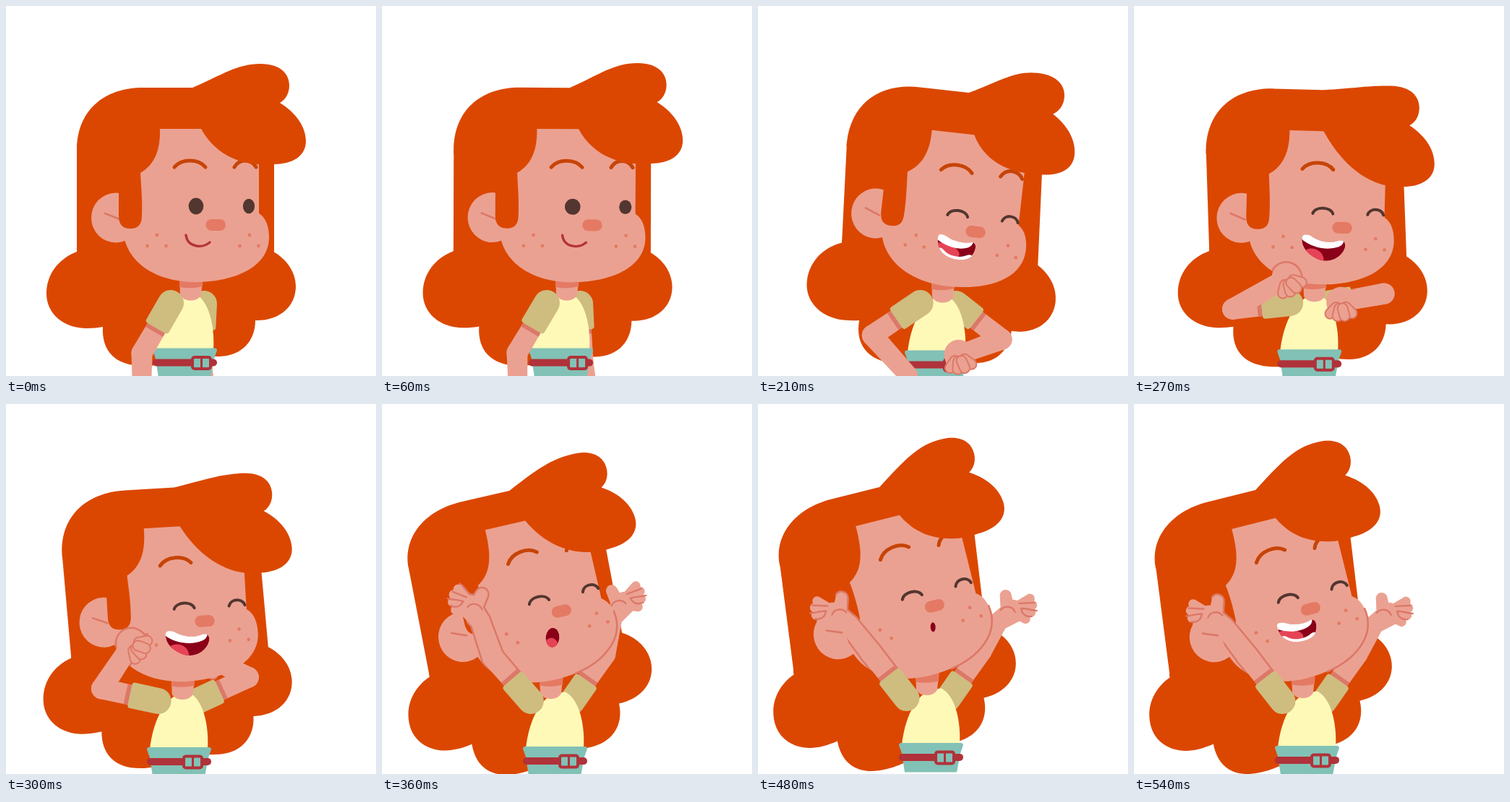
An HTML page with a canvas for the animation above (0.57 s loop, 512 by 512 pixels).

```html
<!DOCTYPE html>
<html lang="en">
<head>
<meta charset="utf-8">
<title>Cheering girl</title>
<style>
html, body { margin: 0; width: 100%; height: 100%; overflow: hidden; background: #fff; }
canvas { display: block; width: 100%; height: 100%; }
</style>
</head>
<body>
<canvas id="stage" width="512" height="512"></canvas>
<script>
const ctx = document.getElementById('stage').getContext('2d');
const LOOP = 570, STEP = 30, RAD = Math.PI / 180;
const HAIR = '#db4700', SKIN = '#eba191', LINE = '#dc7868', BLUSH = '#e47a64',
  BROW = '#c64408', EYE = '#523630', SHIRT = '#fff9b8', SLEEVE = '#cfbc7f',
  SKIRT = '#82c1b6', BELT = '#b0323a', MOUTH = '#8a0019', TONGUE = '#e64456';

// Head: tilt, place, hair sway, quiff sag. Arms: upper angle, fore angle, reach.
const POSES = [
  { at: 0, tilt: 0, x: 0, y: 0, sway: 0, sag: 0, left: [120, 90, 50], right: [93, 81, 46] },
  { at: 150, tilt: 2, x: .5, y: 1, sway: 3.5, sag: -11, left: [125, 83, 50], right: [57, 79, 44] },
  { at: 210, tilt: 6.5, x: 0, y: 5, sway: 12, sag: -5, left: [146, 48, 74], right: [38, 160, 63] },
  { at: 270, tilt: 1.5, x: -6, y: 3, sway: 11, sag: 25, left: [174, -30, 86], right: [-10, 169, 61] },
  { at: 360, tilt: -13, x: -22, y: 1, sway: -4, sag: 15, left: [229, -109, 53], right: [-55, 282, 52] },
  { at: 420, tilt: -14, x: -22, y: -1, sway: -20, sag: 2, left: [232, -128, 50], right: [-55, 300, 48] }
];

const mix = (a, b, k) => Array.isArray(a) ? a.map((v, i) => mix(v, b[i], k)) : a + (b - a) * k;

function poseAt(t) {
  const i = POSES.findLastIndex(p => p.at <= t);
  const a = POSES[i], b = POSES[i + 1] || a;
  let k = (t - a.at) / (b.at - a.at || 1);
  if (i === 0) k *= k;
  const pose = {};
  for (const key in a) pose[key] = mix(a[key], b[key], k);
  pose.lift = .9 * Math.max(0, -pose.tilt);
  return pose;
}

const hopAt = t => -8 * Math.max(0, Math.min((t - 360) / 60, (540 - t) / 120));

const tilted = (deg, x, y) => new DOMMatrix().translate(255 + x, 385 + y).rotate(deg).translate(-255, -385);
const asPath = p => typeof p === 'string' ? new Path2D(p) : p;

function place(path, m) {
  const p = new Path2D();
  p.addPath(asPath(path), m);
  return p;
}

function fill(path, color) {
  ctx.fillStyle = color;
  ctx.fill(asPath(path));
}

function stroke(path, color, width, cap = 'round') {
  ctx.strokeStyle = color;
  ctx.lineWidth = width;
  ctx.lineCap = cap;
  ctx.lineJoin = 'round';
  ctx.stroke(asPath(path));
}

function within(path, paint) {
  ctx.save();
  ctx.clip(asPath(path));
  paint();
  ctx.restore();
}

function oval(x, y, rx, ry, turn = 0) {
  const p = new Path2D();
  p.ellipse(x, y, rx, ry, turn, 0, 7);
  return p;
}

function box(...args) {
  const p = new Path2D();
  p.roundRect(...args);
  return p;
}

// Tapered capsule between two circles.
function limb(x1, y1, r1, x2, y2, r2) {
  const p = new Path2D(), a = Math.atan2(y2 - y1, x2 - x1), q = Math.PI / 2;
  p.arc(x1, y1, r1, a + q, a + 3 * q);
  p.arc(x2, y2, r2, a - q, a + q);
  p.closePath();
  return p;
}

const FACE = 'M170 150 H350 V287 C360 293 364 306 364 320 C364 362 315 382 262 382 C205 382 162 352 162 306 L160 250 Z';
const CURLS = 'M98 335 V340 C72 350 56 372 56 398 C56 426 80 446 112 446 C120 446 128 445 134 444' +
  'C132 478 152 498 190 498 C215 498 235 492 245 484 L295 485 C328 484 345 462 345 435' +
  'C378 436 401 416 401 388 C401 368 388 350 370 340 V335 Z';

function frontHair({ tilt, sag, lift }) {
  const q = (x, y, k = 1) => `${x - tilt * .3 * k} ${y + sag * k} `;
  const top = 113 + lift, part = 270 + lift / 2 - sag * .4;
  return `M98 200 C98 ${145 + lift} 135 ${top} 190 ${top} L258 ${top}` +
    `C${q(300, 95, .6)}${q(320, 80)}${q(352, 80)}C${q(380, 80)}${q(392, 94)}${q(392, 110)}` +
    `C${q(392, 122)}${q(386, 130)}${q(379, 134)}C${q(402, 148)}${q(415, 168)}${q(415, 187)}` +
    `C${q(415, 208)}${q(396, 219)}${q(370, 219)}C${q(340, 222)}${q(295, 215, .6)}${part} 170` +
    `L213 170 C214 ${200 + lift} 205 ${220 + lift} 186 ${231 + lift} C187 250 189 270 188 290` +
    'C188 302 183 308 172 308 C161 308 156 302 156 290 V258 L98 205 Z';
}

function backHair(front, back) {
  fill(place(CURLS, back), HAIR);
  const pt = (m, x, y) => { const p = m.transformPoint({ x, y }); return `${p.x} ${p.y} `; };
  fill(`M${pt(front, 98, 199)}L${pt(front, 371, 210)}L${pt(back, 371, 341)}L${pt(back, 98, 341)}Z`, HAIR);
}

function torso(x, y, neck) {
  ctx.save();
  ctx.translate(x, y);
  fill('M246 400 C225 410 211 440 207 476 H287 C289 440 280 408 262 398 Z', SHIRT);
  fill('M206 473.5 H289 Q293 474 291.5 478 L288 488 L283 514 H211 L207 488 L203.5 478 Q202 474 206 473.5 Z', SKIRT);
  stroke('M208 493.5 H287', BELT, 10);
  ctx.translate(x / 2, 0);
  const buckle = box(258, 486, 25, 16, 3);
  fill(buckle, SKIRT);
  stroke(buckle, BELT, 4);
  stroke('M270.5 487 V501', BELT, 3, 'butt');
  ctx.restore();
  ctx.save();
  ctx.translate(neck, y);
  fill('M240 370 H273 L270 400 C265 410 246 410 241 400 Z', SKIN);
  fill('M240 370 H273 L272 388 Q256 392 240 389 Z', BLUSH);
  ctx.restore();
}

// Two bones from the shoulder; the sleeve lies along the first.
function makeArm(sx, sy, [upper, fore, reach], side, grip) {
  const ux = Math.cos(upper * RAD), uy = Math.sin(upper * RAD);
  const sleeve = side < 0 ? 40 : 36;
  const ex = sx + ux * 80, ey = sy + uy * 80;
  const wx = ex + Math.cos(fore * RAD) * reach, wy = ey + Math.sin(fore * RAD) * reach;
  const open = grip === 'open', fist = grip === 'fist';
  const rest = open ? (side < 0 ? -128 : 300) : (side < 0 ? 0 : 170);
  const hand = new DOMMatrix().translate(wx, wy).rotate(fore - rest).scale(open ? side : 1, 1);
  const parts = [limb(ex, ey, 14.5, wx, wy, 13)];
  const add = (...v) => parts.push(place(limb(...v), hand));
  if (fist) add(0, -1, 20, 0, 1, 20);
  if (open) {
    add(0, 0, 13, 21, -14, 16);
    add(13, -14, 10, 10, -36, 8);
    for (let i = 0; i < 4; i++) {
      const a = i * .18 - .63, r = 54 - i * i * 1.8;
      add(22, -15, 10, r * Math.cos(a), r * Math.sin(a), 6.5);
    }
  }
  const upperLimb = limb(sx + ux * sleeve, sy + uy * sleeve, 14, ex, ey, 14.5);
  return {
    outline: [upperLimb, ...parts],
    upper() { fill(upperLimb, SKIN); },
    sleeve() {
      const cx = sx + ux * sleeve, cy = sy + uy * sleeve;
      stroke(`M${cx} ${cy} l${ux * 6} ${uy * 6}`, LINE, 28, 'butt');
      const m = new DOMMatrix().translate(sx, sy).rotate(upper);
      fill(place(box(-18, -18, sleeve + 18, 36, [18, 4, 4, 18]), m), SLEEVE);
    },
    fore() {
      parts.forEach(p => fill(p, SKIN));
      if (open)
        stroke(place('M3 -16 C9 -23 20 -21 23 -13 M29 -25 L50 -26 M31 -18 C37 -19 46 -15 53 -15 M32 -16 C33 -9 40 -6 46 -7', hand), LINE, 2.4);
      if (fist) for (const x of [-15, 15, -5, 5]) {
        const y = 21 - Math.abs(x) * .35, f = place(limb(x * .45, y * .45, 6, x, y, 6), hand);
        stroke(f, LINE, 4);
        fill(f, SKIN);
      }
    }
  };
}

const SMILE = 'M249 317 C251 334 272 336 282 327';
const GRIN = 'M240 320 C240 313 250 315 254 317 C266 323 276 325 288 323 C296 324 292 337 286 340 C268 343 244 338 240 320 Z';
const LAUGH = 'M240 313 C244 309 252 314 258 317 C268 320 278 321 286 318 C294 317 295 327 288 338 C280 347 254 346 245 334 C240 328 238 318 240 313 Z';
const SHOUT = 'M235 318 C236 311 246 314 250 317 C262 324 276 325 286 321 C296 319 297 328 293 335 C285 349 268 353 255 346 C242 340 234 330 235 318 Z';

function mouth(t) {
  const open = (shape, base, paint) => within(shape, () => { fill(shape, base); paint(); });
  if (t < 120) stroke(SMILE, '#b5343a', 3.4);
  else if (t < 210) open(GRIN, '#fff', () => fill('M287 320 H300 V345 H284 C288 336 282 331 287 320 Z', MOUTH));
  else if (t < 270 || t >= 540) open(LAUGH, MOUTH, () => {
    fill(oval(254, 333, 18, 9, .3), TONGUE);
    stroke('M243 311 C256 319 270 321 279 317', '#fff', 19);
    stroke('M244 337 C256 349 276 348 286 342', '#fff', 13);
  });
  else if (t < 330) open(SHOUT, MOUTH, () => {
    fill(oval(250, 347, 16, 14, .3), TONGUE);
    stroke('M243 314 C256 323 272 324 283 320', '#fff', 20);
  });
  else if (t < 420) open(oval(270, 336, 9.5, 13.5, .3), MOUTH, () => fill(oval(266, 345, 9, 9), TONGUE));
  else fill(oval(281, 331, 3.5, 6.5, .2), MOUTH);
}

function features(t, m, lift) {
  ctx.save();
  ctx.transform(m.a, m.b, m.c, m.d, m.e, m.f);
  for (const [x, w] of [[233, 43], [316, 30]]) {
    const raise = new DOMMatrix().translate(x, 223).rotate(-lift * .8);
    stroke(place(`M0 0 C${w * .23} -12 ${w * .77} -12 ${w} 0`, raise), BROW, 5);
  }
  const squint = .25 * (t / 150) ** 2;
  for (const [x, w] of [[263, 14], [336, 11]]) {
    if (t < 180) fill(oval(x, 277 + squint * 16, w * .74 + squint * 10, (w + 14) * .41 * (1 - squint)), EYE);
    else stroke(`M${x - w} 284 C${x - w * .72} 274 ${x + w * .72} 274 ${x + w} 284`, EYE, 4);
  }
  for (const x of [209, 337]) for (const [dx, dy] of [[0, 0], [-13.5, 15], [12.5, 15]])
    fill(oval(x + dx, 317 + dy, 2.4, 2.4), BLUSH);
  stroke('M284.5 303 H296', BLUSH, 16);
  mouth(t);
  ctx.restore();
}

function draw(t) {
  const pose = poseAt(t), { tilt, x, y, sway, lift } = pose;
  const raised = t >= 330;
  const head = tilted(tilt, x, y), front = tilted(tilt, x + sway / 4, y - lift), back = tilted(tilt, x + sway, y);
  const bodyX = Math.max(-8, x * .8);
  const grip = from => raised ? 'open' : t >= from ? 'fist' : 'none';
  const left = makeArm(228 + bodyX - .13 * (pose.left[0] - 120), 411, pose.left, -1, grip(240));
  const right = makeArm(274 + bodyX * 1.4, 412, pose.right, 1, grip(180));
  const crossed = t >= 180 && !raised;

  ctx.setTransform(1, 0, 0, 1, 0, 0);
  fill('M0 0 H512 V512 H0 Z', '#fff');
  ctx.translate(0, hopAt(t));

  backHair(front, back);
  right.upper();
  if (!crossed) right.fore();
  right.sleeve();
  torso(bodyX, y * .6, x);
  if (crossed) right.fore();

  const face = place(FACE, head);
  fill(place(oval(152, 293, 34, 34.5), tilted(tilt, x, y + lift / 4)), SKIN);
  fill(face, SKIN);
  stroke(place('M137 287 L157 295', head), LINE, 2.6);
  if (raised) stroke(place('M363 308 C370 350 330 374 292 380', head), LINE, 2.6);
  features(t, tilted(tilt, x + sway * .15, y - lift), lift);
  fill(place(frontHair(pose), front), HAIR);

  if (t >= 240) within(face, () => left.outline.forEach(p => stroke(p, LINE, 5)));
  left.upper();
  if (raised) left.fore();
  left.sleeve();
  if (!raised) left.fore();
}

const start = performance.now();
function tick() {
  const t = (performance.now() - start) % LOOP;
  draw(Math.floor(t / STEP) * STEP);
  requestAnimationFrame(tick);
}
tick();
</script>
</body>
</html>
```
